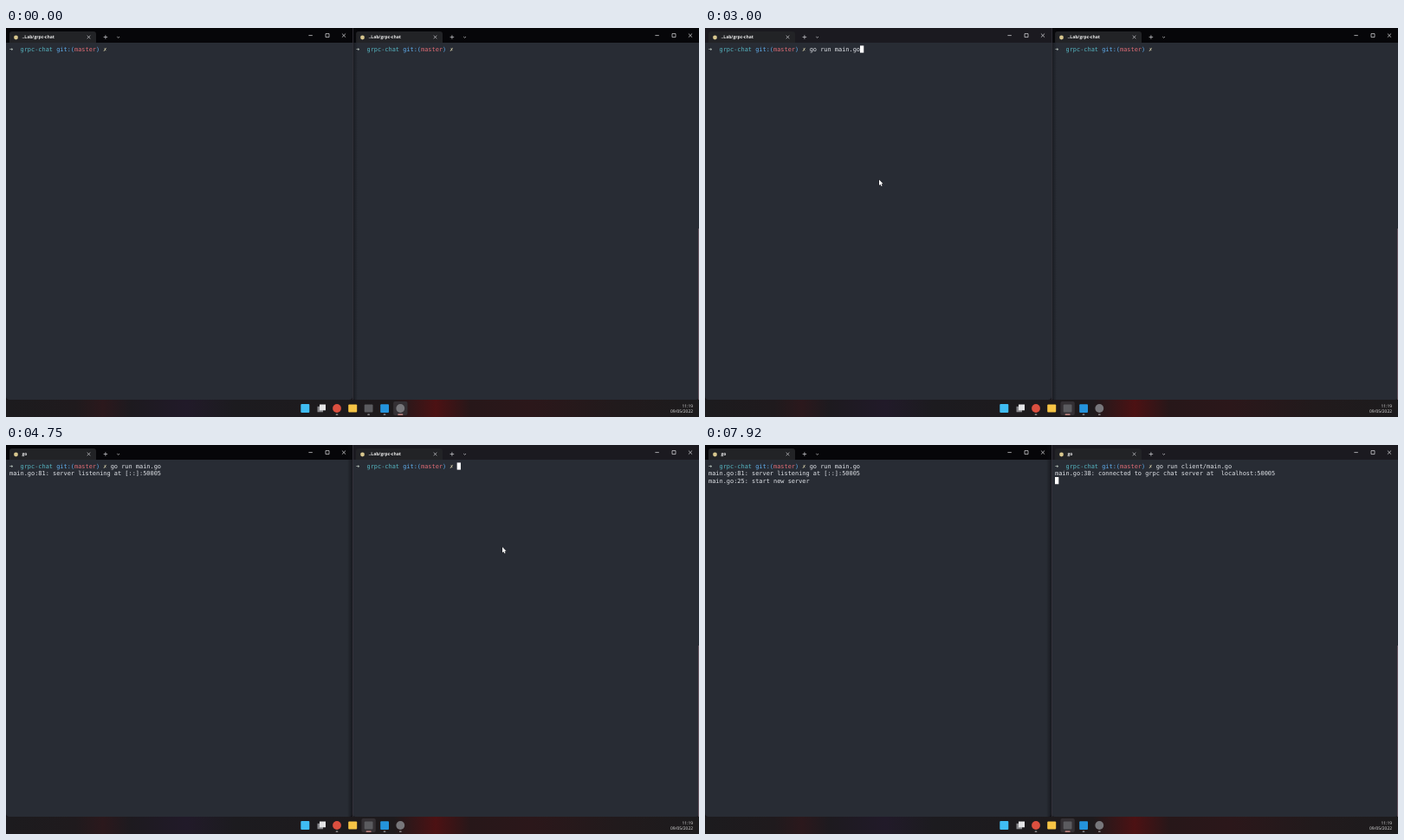
Animation of 800x450 px, one loop 8 s. Source, as an HTML page with a canvas:

```html
<!DOCTYPE html>
<html>
<head>
<meta charset="utf-8">
<style>
html, body { margin: 0; width: 100%; height: 100%; overflow: hidden; background: #111; }
canvas { display: block; width: 800px; height: 450px; }
</style>
</head>
<body>
<canvas id="stage" width="800" height="450"></canvas>
<script>
const ctx = document.getElementById('stage').getContext('2d');
ctx.textRendering = 'geometricPrecision';

const LOOP = 8000, CELL = 4.166, LINE = 8.33;
const MONO = '6.92px "DejaVu Sans Mono", monospace';
const UI = '"Open Sans", sans-serif';
const WHITE = '#e2e5ea', CYAN = '#56b6c2', BLUE = '#61afef', RED = '#e06c75';

const within = (t, ...spans) => spans.some(([a, b]) => t >= a && t < b);
const ease = p => p * p * (3 - 2 * p);

function rect(x, y, w, h, color) {
  ctx.fillStyle = color;
  ctx.fillRect(x, y, w, h);
}

function rounded(x, y, w, h, radii, color) {
  ctx.fillStyle = color;
  ctx.beginPath();
  ctx.roundRect(x, y, w, h, radii);
  ctx.fill();
}

function circle(x, y, r, color) {
  ctx.fillStyle = color;
  ctx.beginPath();
  ctx.arc(x, y, r, 0, Math.PI * 2);
  ctx.fill();
}

function stroke(path, color, width = 0.7) {
  ctx.strokeStyle = color;
  ctx.lineWidth = width;
  ctx.stroke(new Path2D(path));
}

function label(text, x, y, font, color, align = 'left') {
  ctx.font = font;
  ctx.fillStyle = color;
  ctx.textAlign = align;
  ctx.fillText(text, x, y);
}

// Terminal text sits on a fixed character grid.
function put(x0, col, row, text, color) {
  [...text].forEach((ch, i) => {
    if (ch !== ' ') label(ch, x0 + 4 + (col + i) * CELL, 27.1 + row * LINE, MONO, color);
  });
}

function prompt(x0) {
  put(x0, 0, 0, '➜', '#c9d6cc');
  put(x0, 3, 0, 'grpc-chat', CYAN);
  put(x0, 13, 0, 'git:(', BLUE);
  put(x0, 18, 0, 'master', RED);
  put(x0, 24, 0, ')', BLUE);
  put(x0, 26, 0, '✗', '#d6cfaa');
}

function chrome(x0, active, title) {
  rounded(x0, 0, 400, 430, [0, 0, 4, 4], '#282c34');
  rect(x0, 0, 400, 17, active ? '#1b1a20' : '#060609');
  rounded(x0 + 4, 4, 100, 13, [3, 3, 0, 0], '#222326');
  circle(x0 + 11.5, 11, 2.4, '#d8c78e');
  label(title, x0 + 18.5, 12.4, 'bold 5px ' + UI, '#f0f0f0');
  ctx.save();
  ctx.translate(x0, 0);
  stroke('M93.7 8.7l3.6 3.6m0-3.6l-3.6 3.6M112.6 10.5h4.6m-2.3-2.3v4.6M128.2 10l1.4 1.3L131 10', '#d5d5d8');
  stroke('M349.4 8.6h4.4M369 6.6h4v4h-4zM387.9 6.5l4.2 4.2m0-4.2l-4.2 4.2', '#e3e3e5');
  ctx.restore();
}

function terminal(x0, s) {
  chrome(x0, s.active, s.title);
  prompt(x0);
  put(x0, 28, 0, s.cmd.slice(0, s.typed), WHITE);
  if (s.typed) put(x0, 28 + s.typed, 0, s.cmd.slice(s.typed), '#596070');
  s.output.forEach((text, i) => put(x0, 0, i + 1, text, WHITE));
  if (!s.cursor) return;
  const row = s.entered ? s.output.length + 1 : 0;
  const col = s.entered ? 0 : 28 + s.typed;
  rect(x0 + 4 + col * CELL, 20.4 + row * LINE, 4.3, 8.2, '#fff');
  if (!s.entered && s.typed) put(x0, col, 0, s.cmd[s.typed] || '', '#282c34');
}

function leftState(t) {
  const cmd = 'go run main.go', entered = t >= 3170;
  const output = [];
  if (t >= 3460) output.push('main.go:81: server listening at [::]:50005');
  if (t >= 7830) output.push('main.go:25: start new server');
  return {
    cmd, entered, output,
    active: t >= 960 && t < 4670,
    title: entered ? 'go' : '..Lab/grpc-chat',
    typed: t < 1750 ? 0 : t < 2250 ? 1 + Math.floor((t - 1750) / 84) : cmd.length,
    cursor: within(t, [960, 1580], [1750, 2670], [2920, 4420])
  };
}

function rightState(t) {
  const cmd = 'go run client/main.go', entered = t >= 7420;
  return {
    cmd, entered,
    output: t >= 7830 ? ['main.go:38: connected to grpc chat server at  localhost:50005'] : [],
    active: t >= 4670,
    title: entered ? 'go' : '..Lab/grpc-chat',
    typed: t < 5330 ? 0 : t < 6500 ? Math.min(8, 1 + Math.floor((t - 5330) / 100)) : cmd.length,
    cursor: within(t, [4670, 5120], [5330, 7080], [7580, LOOP])
  };
}

const barFill = ctx.createLinearGradient(0, 0, 800, 0);
[[0, '#1c1b1e'], [0.1, '#1f1a1d'], [0.14, '#2b181c'], [0.18, '#1d1a1f'], [0.26, '#211a29'],
 [0.33, '#1c1b1f'], [0.56, '#1e1a1c'], [0.62, '#4c1113'], [0.67, '#271719'],
 [0.76, '#2b171a'], [0.88, '#211a1c'], [1, '#1c1b1d']].forEach(s => barFill.addColorStop(...s));

function taskbar(t) {
  rect(0, 430, 800, 20, barFill);
  const focus = t < 960 ? 455.3 : 418.6;
  rounded(focus - 8.2, 432, 16.4, 16, 2, '#343034');
  rounded(340.3, 435, 10, 10, 1, '#3fbcf2');
  rect(359.5, 437.8, 6.5, 6.5, '#88888c');
  rect(362, 435.5, 7, 6.8, '#e4e4e6');
  circle(382, 440, 4.9, '#db4f3f');
  rounded(395.2, 435.6, 10, 9, 1, '#f6c445');
  rounded(413.7, 435.5, 9.8, 9, 1, '#5b5b5f');
  rounded(432.2, 435.2, 9.8, 9.8, 1, '#2493dc');
  circle(455.3, 440, 4.9, '#77777b');
  for (const x of [382, 418.6, 437, 455.3]) {
    const on = x === focus, w = on ? 6 : 2.6;
    rounded(x - w / 2, 446.6, w, 1.1, 0.5, on ? '#e59a94' : '#a3a0a2');
  }
  label('11:19', 793, 438.6, '4.9px ' + UI, '#e6e6e6', 'right');
  label('09/05/2022', 793, 445.3, '4.9px ' + UI, '#e6e6e6', 'right');
}

function pointer(t) {
  if (t < 80 || t >= 5330) return;
  const enter = ease(Math.min(1, (t - 80) / 770));
  const cross = ease(Math.min(1, Math.max(0, (t - 3920) / 320)));
  const x = 452 - 251 * enter + 372 * cross;
  const y = 449 - 273.5 * enter - 57.5 * cross;
  const arrow = new Path2D('M0 0V6.6L1.5 5.2L2.5 7.4L3.6 6.9L2.6 4.7H4.6Z');
  ctx.save();
  ctx.translate(x, y);
  ctx.strokeStyle = '#15161a';
  ctx.lineWidth = 0.8;
  ctx.stroke(arrow);
  ctx.fillStyle = '#fff';
  ctx.fill(arrow);
  ctx.restore();
}

function seam(rightActive) {
  const x = rightActive ? 394 : 400;
  const shade = ctx.createLinearGradient(x, 0, x + 6, 0);
  const dark = 'rgba(12,13,17,.6)', clear = 'rgba(12,13,17,0)';
  shade.addColorStop(0, rightActive ? clear : dark);
  shade.addColorStop(1, rightActive ? dark : clear);
  rect(x, 0, 6, 430, shade);
  rect(400, 0, 0.8, 430, '#36343d');
  rect(799.2, 232, 0.8, 198, '#75616b');
}

function draw(now) {
  const t = now % LOOP;
  rect(0, 0, 800, 450, '#18161a');
  terminal(0, leftState(t));
  terminal(400, rightState(t));
  seam(t >= 4670);
  taskbar(t);
  pointer(t);
  requestAnimationFrame(draw);
}

const start = performance.now();
draw(0);
function tick() {
  draw = () => {};
}
</script>
</body>
</html>
```
